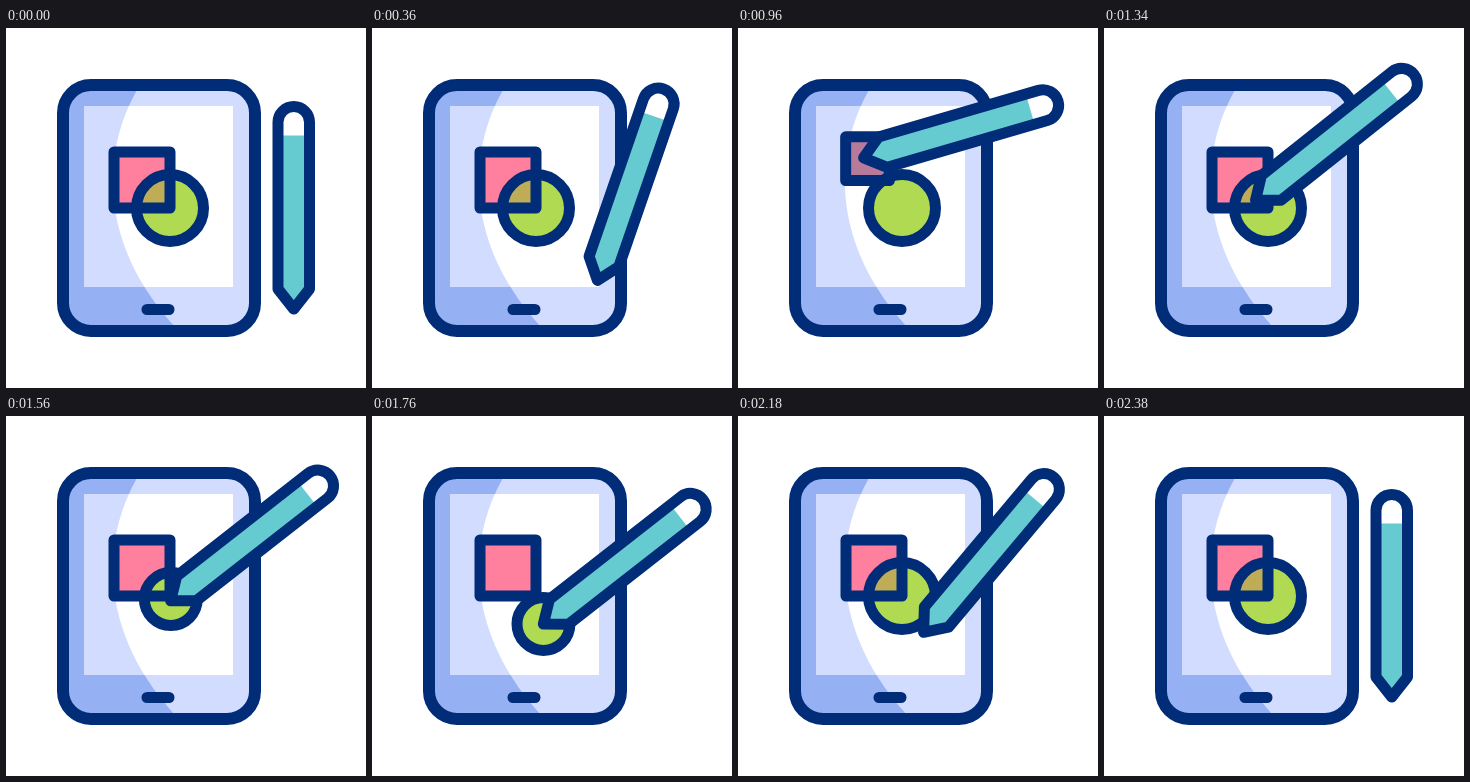
Animation of 360 by 360 pixels, one loop 2400 ms. Source, as an HTML page:

```html
<!DOCTYPE html>
<html lang="en">
<head>
<meta charset="utf-8">
<title>Tablet and stylus</title>
<style>
  html, body { margin: 0; width: 100%; height: 100%; overflow: hidden; background: #fff; }
  svg { display: block; width: 100vw; height: 100vh; }
  .line { fill: none; stroke: #002c78; stroke-width: 11; stroke-linejoin: round; stroke-linecap: round; }
</style>
</head>
<body>
<svg viewBox="0 0 360 360">
  <defs>
    <clipPath id="body"><rect x="57" y="57" width="192" height="246" rx="28"/></clipPath>
    <clipPath id="screen"><rect x="78" y="78" width="149" height="181"/></clipPath>
    <clipPath id="disc"><circle class="circle"/></clipPath>
    <path id="shade" d="M131 62C95 125 93 215 168 298V310H40V50H131Z"/>
    <path id="barrel" d="M272 94.3a15.75 15.75 0 0 1 31.5 0V261L287.75 281 272 261Z"/>
    <clipPath id="inside"><use href="#barrel"/></clipPath>
  </defs>

  <g clip-path="url(#body)">
    <rect x="50" y="50" width="206" height="260" fill="#d1dcfe"/>
    <use href="#shade" fill="#95b1f4"/>
  </g>
  <g clip-path="url(#screen)">
    <rect x="78" y="78" width="149" height="181" fill="#fff"/>
    <use href="#shade" fill="#d1dcfe"/>
  </g>
  <rect class="line" x="57" y="57" width="192" height="246" rx="28" style="stroke-width:12"/>
  <path class="line" d="M141 281.5H163"/>

  <rect class="square" id="squareFill"/>
  <circle class="circle" fill="#afda52"/>
  <g clip-path="url(#disc)"><rect class="square" id="overlap"/></g>
  <rect class="square line"/>
  <circle class="circle line"/>

  <g id="pen">
    <use href="#barrel" fill="#fff"/>
    <rect x="266" y="107.5" width="44" height="180" fill="#66cbd1" clip-path="url(#inside)"/>
    <use href="#barrel" class="line"/>
  </g>
</svg>
<script>
  const LOOP = 2400;
  const PINK = [255, 127, 159], MAUVE = [176, 122, 154];
  const GREEN = [175, 218, 82], OLIVE = [190, 173, 86];
  const CAP = [287.75, 94.3];

  // Stylus poses: time, cap x, cap y, angle
  const poses = [
    [220, ...CAP, 0],
    [560, 284, 45, 51],
    [605, 284, 45, 51],
    [910, 306.5, 80, 75.5],
    [1220, 284, 45, 51],
    [1460, 311, 67, 52],
    [1500, 311, 67, 52],
    [1810, 319, 95, 52],
    [2100, 311, 67, 52],
    [2360, ...CAP, 0]
  ];

  const all = name => document.querySelectorAll(name);
  const squares = all('.square'), circles = all('.circle');
  const [pen, squareFill, overlap] = ['#pen', '#squareFill', '#overlap'].map(s => document.querySelector(s));

  const mix = (a, b, p) => a + (b - a) * p;
  const mixAll = (a, b, p) => a.map((v, i) => mix(v, b[i], p));
  const rgb = c => `rgb(${c.map(Math.round).join()})`;
  const ease = (t, from, to) => {
    const p = Math.min(1, Math.max(0, (t - from) / (to - from)));
    return p * p * (3 - 2 * p);
  };
  const pulse = (t, a, b, c, d) => ease(t, a, b) - ease(t, c, d);

  function poseAt(t) {
    const i = poses.findIndex(p => p[0] > t);
    if (i <= 0) return [...CAP, 0];
    const a = poses[i - 1], b = poses[i];
    return mixAll(a, b, ease(t, a[0], b[0])).slice(1);
  }

  function set(nodes, attrs) {
    for (const node of nodes)
      for (const key in attrs) node.setAttribute(key, attrs[key]);
  }

  function draw(t) {
    const squarePress = pulse(t, 520, 605, 1220, 1300);
    const squareDrag = pulse(t, 605, 910, 910, 1220);
    const circlePress = pulse(t, 1470, 1560, 2100, 2180);
    const circleDrag = pulse(t, 1500, 1810, 1810, 2100);

    const side = 56 * mix(1, 0.78, squarePress);
    set(squares, {
      x: 136 - 7 * squareDrag - side / 2,
      y: 152 - 23 * squareDrag - side / 2,
      width: side, height: side
    });
    set(circles, {
      cx: 164 + 8 * circleDrag,
      cy: 180 + 30 * circleDrag,
      r: 33.5 * mix(1, 0.79, circlePress)
    });

    const tint = mixAll(PINK, MAUVE, squareDrag);
    const shared = mixAll(mixAll(OLIVE, tint, squarePress), GREEN, circlePress);
    squareFill.setAttribute('fill', rgb(tint));
    overlap.setAttribute('fill', rgb(shared));

    const [x, y, angle] = poseAt(t);
    pen.setAttribute('transform',
      `translate(${x} ${y}) rotate(${angle}) translate(${-CAP[0]} ${-CAP[1]})`);
  }

  function tick() {
    draw(performance.now() % LOOP);
    requestAnimationFrame(tick);
  }
  tick();
</script>
</body>
</html>
```
